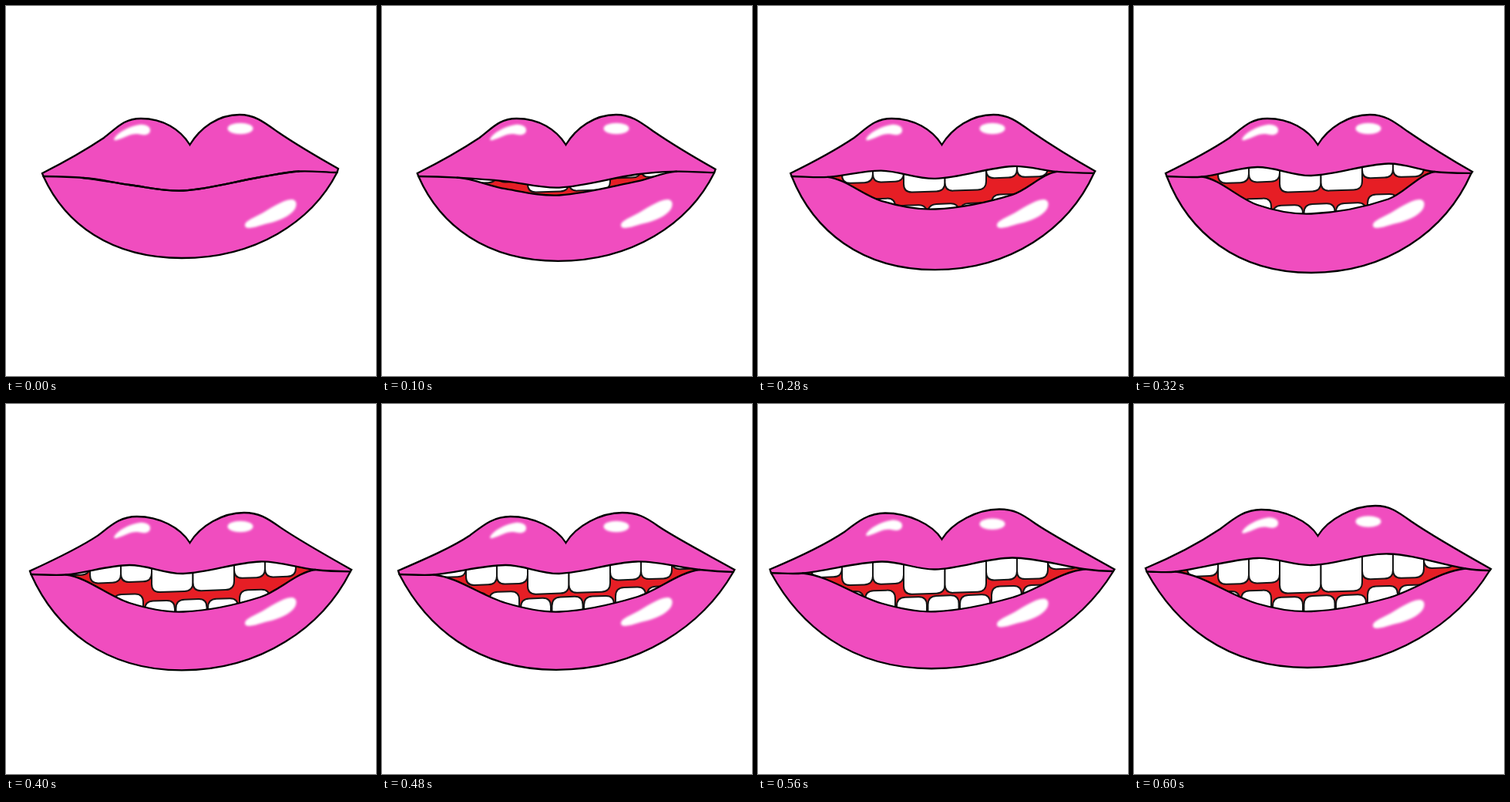
Write an HTML page that moves like this. It is 480 px wide and 480 px high and loops after 1.2 s.

```html
<!DOCTYPE html>
<html lang="en">
<head>
<meta charset="utf-8">
<title>Smiling lips</title>
<style>
  html, body { margin: 0; width: 100%; height: 100%; overflow: hidden; background: #fff; }
  svg { display: block; width: 100%; height: 100%; }
  .line { stroke: #000; stroke-width: 2.3; stroke-linecap: round; }
  .teeth { fill: #fff; stroke: #161616; stroke-width: 2; }
  .shine { fill: #fff; filter: url(#soft); }
</style>
</head>
<body>
<svg viewBox="0 0 480 480">
  <defs>
    <filter id="soft" x="-20%" y="-40%" width="140%" height="180%"><feGaussianBlur stdDeviation="1.7"/></filter>
    <clipPath id="inside"><path id="clip"/></clipPath>
  </defs>
  <path id="lips" class="line" fill="#f04dbf"/>
  <g id="shineTop" class="shine">
    <path d="M140 173C144 164 160 156 173 154C182 153 188 157 187 162C186 168 178 168 171 166C162 165 153 171 145 173.5C142 174.5 140 174.5 140 173Z"/>
    <ellipse cx="304" cy="159" rx="16.5" ry="7.3"/>
  </g>
  <path id="shineLow" class="shine" d="M310 285C309 280 318 276 328 271C342 264 357 252 370 251C377 251 378 257 375 263C370 272 354 279 340 282C328 285 311 292 310 285Z"/>
  <g clip-path="url(#inside)">
    <path id="mouth" fill="#e61e25"/>
    <g id="upper" class="teeth"></g>
    <g id="lower" class="teeth"></g>
  </g>
  <path id="topLine" class="line" fill="none"/>
  <path id="lowLine" class="line" fill="none"/>
</svg>
<script>
const set = (id, name, value) => document.getElementById(id).setAttribute(name, value);
const clamp = v => Math.min(1, Math.max(0, v));

// A tooth from its root to a rounded biting edge
function tooth(mid, width, edge, root) {
  const l = mid - width / 2, r = mid + width / 2, c = 11, k = Math.sign(edge - root) * c;
  return `<path d="M${l} ${root}V${edge - k}Q${l} ${edge} ${l + c} ${edge}H${r - c}` +
    `Q${r} ${edge} ${r} ${edge - k}V${root}Z"/>`;
}

// Both rows mirror around the middle; a slight skew tilts them later
function buildTeeth() {
  let upper = '', lower = tooth(-2, 40, 256.5, 310);
  for (const side of [-1, 1]) {
    upper += tooth(side * 26.75, 53.5, 240, 150);
    for (let i = 1; i <= 3; i++) {
      upper += tooth(side * (33.5 + 40 * i), 40, i < 3 ? 225.5 : 214, 150);
      lower += tooth(side * 41 * i - 2, 39, i < 2 ? 257 : 247, 310);
    }
  }
  document.getElementById('upper').innerHTML = upper;
  document.getElementById('lower').innerHTML = lower;
}

// Smooth curve through points ordered along x, nearly level at both ends
function curve(pts) {
  const n = pts.length - 1;
  const slope = i => {
    const a = pts[Math.max(i - 1, 0)], b = pts[Math.min(i + 1, n)];
    return (b[1] - a[1]) / (b[0] - a[0]) * (i === 0 || i === n ? .25 : 1);
  };
  let d = `M${pts[0]}`;
  for (let i = 0; i < n; i++) {
    const [x, y] = pts[i], [X, Y] = pts[i + 1], h = (X - x) / 3;
    d += `C${x + h} ${y + h * slope(i)} ${X - h} ${Y - h * slope(i + 1)} ${X} ${Y}`;
  }
  return d;
}

// The jaw opens, then the corners widen, then the upper lip lifts
function draw(step) {
  const open = clamp(step / 5), wide = clamp((step - 5) / 5), lift = clamp((step - 10) / 2);
  const at = (base, o, w, l) => base + o * open + w * wide + l * lift;

  const lx = at(47, -6, -25, -1), ly = at(217, 0, -1, -3);
  const rx = at(431, 8, 23, 1), ry = at(211, 4, 0, -1);
  const tipL = [lx + 1.5, at(221, 0, 0, -3.5)], tipR = [rx - 1.5, at(216, 1, 1, -2)];

  // Mouth lines meet at the inner corners and part between them
  const inL = [at(100, -12, -26, -8), at(223, -1.5, 0, -4)];
  const inR = [at(380, 10, 28, 12), at(214.5, .5, 0, -1.5)];
  const top = [[160, at(232, -23, 0, -9)], [230, at(239.5, -19.5, 0, -11)], [330, at(222, -17.5, 0, -10)]];
  const low = [inL, [160, at(232, 26, 0, 1)], [230, at(239.5, 30, 0, -.5)], [330, at(222, 28.5, 0, 1)], inR];
  const topD = curve([tipL, inL, ...top, inR, tipR]);
  const hole = topD + curve([...low].reverse()).replace('M', 'L') + 'Z';

  // Outer shape: two peaks, the bow between them, and the chin curve
  const rise = -9 * lift;
  const peakL = [at(175, -2, -8, 0), 146 + rise], peakR = [at(303, 3, 7, 0), 141 + rise];
  const kneeL = [at(127, -3, -12, 0), at(171, 0, -1, -8)];
  const kneeR = [at(352, 2, 6, 0), at(163, -1, -4, -5.5)];
  const cx = at(228, 2, -5, 0), cy = at(327, 19, -1.5, -2.5);
  const bend = .42 + .05 * wide;
  const outer = `M${lx} ${ly}` +
    `C${lx + (kneeL[0] - lx) * .37} ${ly - 15} ${kneeL[0] - 24} ${kneeL[1] + 16} ${kneeL}` +
    `C${kneeL[0] + 17} ${kneeL[1] - 13} ${peakL[0] - 22} ${peakL[1]} ${peakL}` +
    `C${peakL[0] + 29} ${peakL[1]} 226 ${160 + rise} 238.5 ${180 + rise}` +
    `C252 ${158 + rise} ${peakR[0] - 28} ${peakR[1]} ${peakR}` +
    `C${peakR[0] + 19} ${peakR[1]} ${kneeR[0] - 18} ${kneeR[1] - 13} ${kneeR}` +
    `C${kneeR[0] + 22} ${kneeR[1] + 15} ${rx - 32} ${ry - 18} ${rx} ${ry}L${tipR}` +
    `C${tipR[0] - 33 - 8 * wide} ${cy - bend * (cy - tipR[1])} ${cx + (rx - cx) * .47} ${cy} ${cx} ${cy}` +
    `C${cx - (cx - lx) * .51} ${cy} ${tipL[0] + 28 + 8 * wide} ${cy - bend * (cy - tipL[1])} ${tipL}Z`;

  set('lips', 'd', outer);
  set('mouth', 'd', hole);
  set('clip', 'd', hole);
  set('topLine', 'd', topD);
  set('lowLine', 'd', curve(low));
  set('upper', 'transform', `translate(242.5 ${at(0, 0, 6.5, -2.5)}) skewY(-2)`);
  set('lower', 'transform', `translate(242.5 ${at(0, 0, -8, 0)}) skewY(-2)`);
  set('shineTop', 'transform', `translate(0 ${at(0, 0, 0, -6.5)})`);
  set('shineLow', 'transform', `translate(0 ${at(0, 0, 0, 3)})`);
}

// Two steps of 100 ms, then one every 40 ms until the smile holds
function stepAt(t) {
  return t < 200 ? Math.floor(t / 100) : Math.min(12, 2 + Math.floor((t - 200) / 40));
}

buildTeeth();
let shown = -1;
const start = performance.now();
function tick() {
  const step = stepAt((performance.now() - start) % 1200);
  if (step !== shown) draw(shown = step);
  requestAnimationFrame(tick);
}
tick();
</script>
</body>
</html>
```
